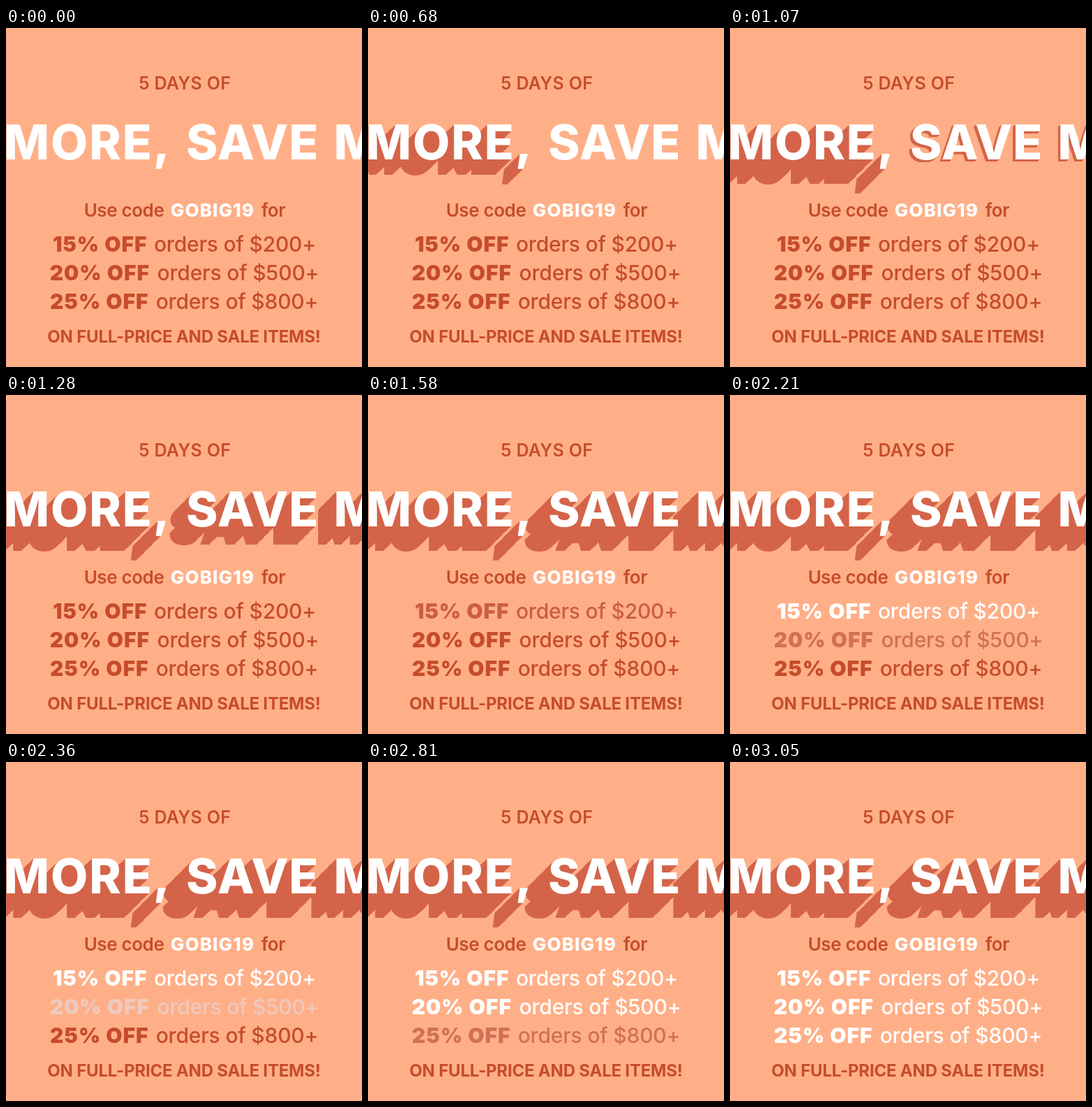
Recreate the animation shown at these times as an HTML page without scripts. Size 510 px wide and 485 px high, loop 4200 ms.

```html
<!DOCTYPE html>
<html lang="en">
<head>
<meta charset="utf-8">
<title>5 Days of Savings</title>
<style>
  :root {
    --bg: #ffaf87;
    --ink: #c64c2b;
    --shade: #d46449;
    --slab: 3.27px;
  }
  html, body {
    margin: 0;
    width: 100%;
    height: 100%;
    overflow: hidden;
    background: var(--bg);
  }
  svg {
    display: block;
    font-family: Inter, "Liberation Sans", sans-serif;
  }
  .head { font-size: 69px; font-weight: 800; letter-spacing: 1.9px; }
  .save { letter-spacing: .9px; text-anchor: middle; }
  .white { fill: #fff; }
  .copy { fill: var(--ink); font-size: 26px; font-weight: 600; text-anchor: middle; letter-spacing: -.4px; }
  .days { font-size: 25px; letter-spacing: .3px; }
  .code { fill: #fff; font-weight: 800; letter-spacing: 1.1px; }
  .deal { font-size: 30px; font-weight: 500; letter-spacing: -.2px; }
  .off { font-weight: 900; letter-spacing: 1px; }
  .note { font-size: 24px; font-weight: 700; letter-spacing: -.2px; }

  /* eleven slabs slide apart into one diagonal extrusion */
  .shadow { fill: var(--shade); }
  .shadow use { animation: 4.2s infinite; }
  .first use { animation-name: first; }
  .second use { animation-name: second; }
  .d1 { animation: d1 4.2s infinite; }
  .d2 { animation: d2 4.2s infinite; }
  .d3 { animation: d3 4.2s infinite; }

  @keyframes first {
    0% { visibility: hidden; transform: translate(0, 0); animation-timing-function: step-end; }
    11.905% { visibility: visible; transform: translate(0, 0); animation-timing-function: steps(11, jump-none); }
    19.762%, 100% {
      visibility: visible;
      transform: translate(calc(var(--k) * -1 * var(--slab)), calc(var(--k) * var(--slab)));
    }
  }
  @keyframes second {
    0% { visibility: hidden; transform: translate(0, 0); animation-timing-function: step-end; }
    25.476% { visibility: visible; transform: translate(0, 0); animation-timing-function: steps(11, jump-none); }
    33.333%, 100% {
      visibility: visible;
      transform: translate(calc(var(--k) * -1 * var(--slab)), calc(var(--k) * var(--slab)));
    }
  }
  @keyframes d1 {
    0% { fill: var(--ink); animation-timing-function: step-end; }
    37.619% { fill: var(--ink); animation-timing-function: steps(10, start); }
    44.762%, 100% { fill: #fff; }
  }
  @keyframes d2 {
    0% { fill: var(--ink); animation-timing-function: step-end; }
    51.905% { fill: var(--ink); animation-timing-function: steps(10, start); }
    59.048%, 100% { fill: #fff; }
  }
  @keyframes d3 {
    0% { fill: var(--ink); animation-timing-function: step-end; }
    66.19% { fill: var(--ink); animation-timing-function: steps(10, start); }
    73.333%, 100% { fill: #fff; }
  }
</style>
</head>
<body>
  <svg width="510" height="485" viewBox="0 0 510 485">
    <defs>
      <g id="more" class="head">
        <text x="-3" y="187.5">MORE,</text>
      </g>
      <g id="save" class="head">
        <text class="save" x="353" y="187.5">SAVE</text>
        <text x="469.5" y="187.5">MORE</text>
      </g>
      <g id="moreSlab">
        <use href="#more" x="-1.09" y="1.09"/>
        <use href="#more" x="-2.18" y="2.18"/>
        <use href="#more" x="-3.27" y="3.27"/>
      </g>
      <g id="saveSlab">
        <use href="#save" x="-1.09" y="1.09"/>
        <use href="#save" x="-2.18" y="2.18"/>
        <use href="#save" x="-3.27" y="3.27"/>
      </g>
    </defs>

    <g class="shadow second">
      <use href="#saveSlab" style="--k:0"/>
      <use href="#saveSlab" style="--k:1"/>
      <use href="#saveSlab" style="--k:2"/>
      <use href="#saveSlab" style="--k:3"/>
      <use href="#saveSlab" style="--k:4"/>
      <use href="#saveSlab" style="--k:5"/>
      <use href="#saveSlab" style="--k:6"/>
      <use href="#saveSlab" style="--k:7"/>
      <use href="#saveSlab" style="--k:8"/>
      <use href="#saveSlab" style="--k:9"/>
      <use href="#saveSlab" style="--k:10"/>
    </g>
    <g class="shadow first">
      <use href="#moreSlab" style="--k:0"/>
      <use href="#moreSlab" style="--k:1"/>
      <use href="#moreSlab" style="--k:2"/>
      <use href="#moreSlab" style="--k:3"/>
      <use href="#moreSlab" style="--k:4"/>
      <use href="#moreSlab" style="--k:5"/>
      <use href="#moreSlab" style="--k:6"/>
      <use href="#moreSlab" style="--k:7"/>
      <use href="#moreSlab" style="--k:8"/>
      <use href="#moreSlab" style="--k:9"/>
      <use href="#moreSlab" style="--k:10"/>
    </g>
    <g class="white">
      <use href="#save"/>
      <use href="#more"/>
    </g>

    <g class="copy">
      <text class="days" x="256.2" y="87.5">5 DAYS OF</text>
      <text x="169" y="269.5">Use code</text>
      <text class="code" x="296" y="269.5">GOBIG19</text>
      <text x="383" y="269.5">for</text>
      <g class="deal d1">
        <text class="off" x="134.7" y="320">15% OFF</text>
        <text x="328" y="320">orders of $200+</text>
      </g>
      <g class="deal d2">
        <text class="off" x="134.3" y="361">20% OFF</text>
        <text x="332.5" y="361">orders of $500+</text>
      </g>
      <g class="deal d3">
        <text class="off" x="133.8" y="402">25% OFF</text>
        <text x="331" y="402">orders of $800+</text>
      </g>
      <text class="note" x="255" y="450">ON FULL-PRICE AND SALE ITEMS!</text>
    </g>
  </svg>
</body>
</html>
```
